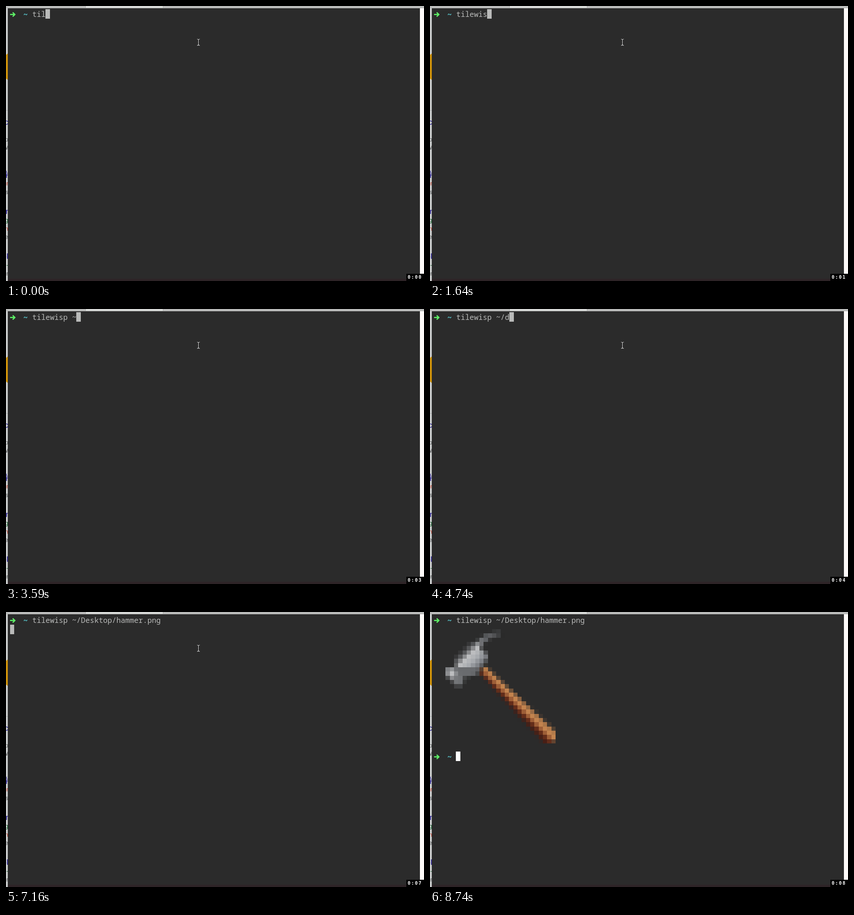
Recreate the animation shown at these times as an HTML page with a canvas. Size 922 by 607 pixels, loop 9190 ms.

```html
<!DOCTYPE html>
<html lang="en">
<head>
<meta charset="utf-8">
<title>Terminal</title>
<style>
  html, body { margin: 0; width: 100%; height: 100%; overflow: hidden; background: #2b2b2b; }
  canvas { display: block; }
</style>
</head>
<body>
<canvas id="stage" width="922" height="607"></canvas>
<script>
const ctx = document.getElementById('stage').getContext('2d');
const LOOP = 9190, ENTER = 7160, OUTPUT = 7460;
const COL = 9.78, ROW = 21.5, LEFT = 9, TOP = 7;
const CELL = 9.33;
const MONO = '16.3px "Noto Sans Mono", monospace';
const SANS = 'Arial, "Liberation Sans", sans-serif';

// Typing: a path is begun, completed, begun again, completed
const prefixes = (string, from) =>
  Array.from({ length: string.length - from + 1 }, (_, i) => string.slice(0, from + i));
const COMMAND = 'tilewisp ~/', FOLDER = COMMAND + 'Desktop/';
const states = [
  ...prefixes(COMMAND + 'des', 3),
  ...prefixes(FOLDER + 'hamm', FOLDER.length),
  FOLDER + 'hammer.png '
];
const keyTimes = [0, 290, 440, 890, 1640, 1940, 2690, 3590, 3890, 4740, 4890, 5180,
  5480, 5920, 6070, 6200, 6330, 6460];
// The three-letter start is already on screen, so each time belongs to one state
const typedAt = t => states[keyTimes.filter(at => at <= t).length - 1];

function rect(x, y, w, h, color) {
  ctx.fillStyle = color;
  ctx.fillRect(x, y, w, h);
}

function text(string, x, y, color, font, align = 'left') {
  ctx.fillStyle = color;
  ctx.font = font;
  ctx.textAlign = align;
  ctx.fillText(string, x, y);
}

function polygon(c, fill, ...points) {
  c.fillStyle = fill;
  c.beginPath();
  points.forEach(([x, y]) => c.lineTo(x, y));
  c.fill();
}

function shade(gradient, ...colors) {
  colors.forEach((color, i) => gradient.addColorStop(i / (colors.length - 1), color));
  return gradient;
}

// Smooth shapes on a tiny canvas become pixel art when enlarged
function makeHammer() {
  const small = document.createElement('canvas');
  small.width = small.height = 28;
  const c = small.getContext('2d');

  c.strokeStyle = shade(c.createLinearGradient(14, 0, 8, 4), '#3c3d3e', '#65676a', '#8c8f93');
  c.lineWidth = 1.4;
  c.beginPath();
  c.moveTo(14, 0.9);
  c.quadraticCurveTo(10.6, 1.1, 8.2, 4);
  c.stroke();

  const steel = shade(c.createLinearGradient(5.5, 5.5, 9.5, 9.5),
    '#58595b', '#bcbdbf', '#a8abaf', '#808388', '#5c5e62');
  polygon(c, steel, [7, 3.2], [9, 3], [9.4, 5], [11.1, 6.1], [10.4, 8], [9, 9.2], [3.6, 9.2], [3, 7.2]);
  polygon(c, '#696b6e', [3, 9], [9, 9], [8.5, 10.7], [6, 11.2], [3, 11]);
  const face = shade(c.createRadialGradient(2.4, 10.4, 0, 2.4, 10.4, 3), '#c4c5c7', '#76787b', '#707275');
  polygon(c, face, [1, 9.1], [3, 9], [4, 10.6], [5.4, 11.5], [5, 13.3], [3.6, 13.4], [1.1, 11.1]);

  const wood = shade(c.createLinearGradient(9, 11, 11, 9),
    '#4a1f15', '#642d1a', '#9d5e37', '#c2834e', '#b97e4c');
  polygon(c, wood, [10.3, 8.7], [27, 24.3], [27, 26], [26, 27], [24.3, 27], [9, 10.2]);
  return small;
}
const hammer = makeHammer();

function drawSurroundings() {
  rect(0, 0, 922, 607, '#c8caca');
  rect(913, 0, 9, 607, '#fdfaf9');
  rect(0, 230, 4, 1, '#acaeae');
  ctx.fillStyle = '#cf930b';
  ctx.beginPath();
  ctx.arc(25, 134, 36, 0, Math.PI * 2);
  ctx.fill();

  // Slivers of a page behind the window: a heading, then evenly spaced lines
  const tints = { g: '#17652f', '-': '#17652f', er: '#c43a26', n: '#c43a26' };
  const blocks = [[262, 'c', '', 'p', 'W'], [378, '番', 'er', 's'], [459, 'r', 'g', 'n', 'e'], [558, '-l', '-', 'r']];
  for (const [top, heading, ...lines] of blocks) {
    text(heading, 5, top, '#1a1091', `17px ${SANS}`, 'right');
    lines.forEach((line, i) =>
      text(line, 5, top + 18.4 * (i + 1), tints[line] || '#505253', `13px ${SANS}`, 'right'));
  }

  rect(0, 0, 922, 5, '#bbbcbb');
  rect(175, 0, 172, 4, '#a5a6a5');
  rect(176, 0, 170, 4, '#d8dad8');
  rect(4, 5, 909, 602, '#2b2b2b');
  rect(4, 602, 909, 5, '#2e2427');
}

function drawPrompt(row) {
  const y = TOP + row * ROW + 11.7;
  ctx.strokeStyle = '#5ffa68';
  ctx.lineWidth = 2.5;
  ctx.beginPath();
  ctx.moveTo(9, y);
  ctx.lineTo(19.5, y);
  ctx.moveTo(14.8, y - 4.6);
  ctx.lineTo(19.6, y);
  ctx.lineTo(14.8, y + 4.6);
  ctx.stroke();
  text('~', LEFT + 3 * COL, y + 6.3, '#5fdce4', `bold ${MONO}`);
}

function drawCursor(col, row, color) {
  const x = Math.floor(LEFT + col * COL);
  const next = Math.floor(LEFT + (col + 1) * COL);
  rect(x, Math.floor(TOP + row * ROW), next - x, 21, color);
}

function drawPointer(x, y) {
  const beam = (color, width) => {
    ctx.strokeStyle = color;
    ctx.lineWidth = width;
    ctx.beginPath();
    for (const end of [-1, 1]) {
      ctx.moveTo(x - 3, y + 7 * end);
      ctx.quadraticCurveTo(x, y + 7 * end, x, y + 5 * end);
      ctx.quadraticCurveTo(x, y + 7 * end, x + 3, y + 7 * end);
    }
    ctx.moveTo(x, y - 5);
    ctx.lineTo(x, y + 5);
    ctx.stroke();
  };
  beam('#151515', 2.6);
  beam('#e6e6e6', 1.1);
}

function drawClock(t) {
  rect(883, 591, 39, 16, '#000');
  ctx.letterSpacing = '2px';
  text(`0:0${Math.floor(t / 1000 + 0.01)}`, 886, 602, '#fff', 'bold 10px "DejaVu Sans Mono", monospace');
  ctx.letterSpacing = '0px';
}

function draw(t) {
  drawSurroundings();
  const typed = typedAt(t);
  drawPrompt(0);
  text(typed, LEFT + 5 * COL, TOP + 17, '#b9bab9', MONO);

  if (t < ENTER) {
    drawCursor(5 + typed.length, 0, '#b9bab9');
  } else if (t < OUTPUT) {
    drawCursor(0, 1, '#b9bab9');
  } else {
    ctx.imageSmoothingEnabled = false;
    ctx.drawImage(hammer, 25, 38, 28 * CELL, 28 * CELL);
    drawPrompt(14);
    drawCursor(5, 14, '#fff');
  }

  // The pointer leaves in four eased jumps, then hides
  const jump = Math.max(0, Math.floor((t - 8050) / 137));
  if (jump < 5) {
    const p = jump / 4;
    const ease = p * p * (3 - 2 * p);
    drawPointer(424.5 + 399 * ease, 80 + 485 * ease);
  }
  drawClock(t);
}

const start = performance.now();
function frame() {
  draw((performance.now() - start) % LOOP);
  requestAnimationFrame(frame);
}
frame();
</script>
</body>
</html>
```
